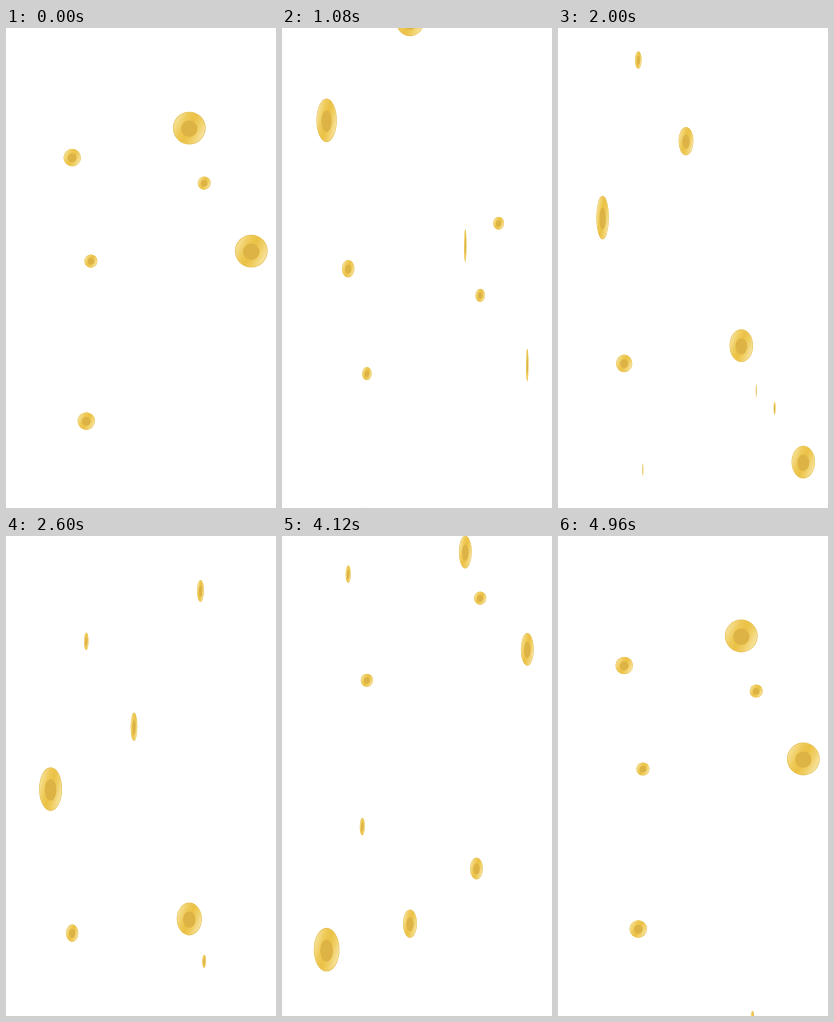
An HTML page that plays this animation: 270 by 480 pixels, repeating every 5000 ms.

```html
<!DOCTYPE html>
<html lang="en">
<head>
<meta charset="utf-8">
<title>Falling coins</title>
<style>
  html, body { margin: 0; width: 100%; height: 100%; overflow: hidden; background: #fff; }
  svg { display: block; width: 100%; height: 100%; }
</style>
</head>
<body>
<svg id="stage" viewBox="0 0 270 480">
  <defs>
    <linearGradient id="gold" x1="0" y1=".25" x2="1" y2=".75">
      <stop offset="0" stop-color="#f7e5a2"/>
      <stop offset=".3" stop-color="#efca58"/>
      <stop offset=".5" stop-color="#ebc145"/>
      <stop offset=".72" stop-color="#f0cf65"/>
      <stop offset="1" stop-color="#f8e8ae"/>
    </linearGradient>
    <g id="coin">
      <circle r="1" fill="#e6c055"/>
      <circle r=".96" fill="url(#gold)"/>
      <circle r=".5" cy=".04" fill="#dcb344"/>
    </g>
  </defs>
</svg>
<script>
const LOOP = 5000, END = 4960;
const svg = document.getElementById('stage');
const passes = [];

// One straight fall at constant speed and spin, face-on at height y at time t0.
function addPass(x, r, t0, y, speed, halfTurn) {
  const el = document.createElementNS(svg.namespaceURI, 'use');
  el.setAttribute('href', '#coin');
  svg.append(el);
  passes.push({ el, x, r, t0, y, speed, halfTurn });
}

// Smaller coins spin faster; the spin changes when a coin comes round again.
const big = { r: 16.4, leave: 2330, arrive: 2770 };
const mid = { r: 8.8, leave: 505, arrive: 356 };
const small = { r: 6.6, leave: 210.5, arrive: 208 };

// In view when the loop starts: falls out, then returns to the same spot by END.
function addLooping(size, x, y, leaveSpeed, arriveSpeed) {
  addPass(x, size.r, 0, y, leaveSpeed, size.leave);
  addPass(x, size.r, END, y, arriveSpeed, size.arrive);
}

// Falls through once, from above the stage.
function addSingle(x, r, enter, speed, halfTurn) {
  addPass(x, r, enter, -r, speed, halfTurn);
}

addLooping(big, 183.3, 100, .1088, .1);
addLooping(big, 245.3, 223, .1055, .1307);
addLooping(mid, 66.2, 129.5, .1029, .1089);
addLooping(mid, 80.3, 393, .0884, .122);
addLooping(small, 198.2, 155, .1039, .1107);
addLooping(small, 84.9, 233, .1042, .1058);

addSingle(44.6, 21.9, 0, .1057, 1475);
addSingle(216.6, 6.5, 78, .2011, 204);
addSingle(128, 14.2, 1018, .1295, 4150);
addSingle(194.5, 11, 2240, .1826, 1050);

function place({ el, x, r, t0, y, speed, halfTurn }, t) {
  const age = t - t0;
  const turns = Math.abs(age) / halfTurn;
  const rx = Math.max(.4, r * Math.abs(1 - 2 * (turns % 1)));
  el.setAttribute('transform', `translate(${x} ${y + speed * age}) scale(${rx} ${r})`);
}

const start = performance.now();
function draw(now) {
  const t = Math.min(Math.max(0, now - start) % LOOP, END);
  for (const pass of passes) place(pass, t);
  requestAnimationFrame(draw);
}
draw(start);
</script>
</body>
</html>
```
